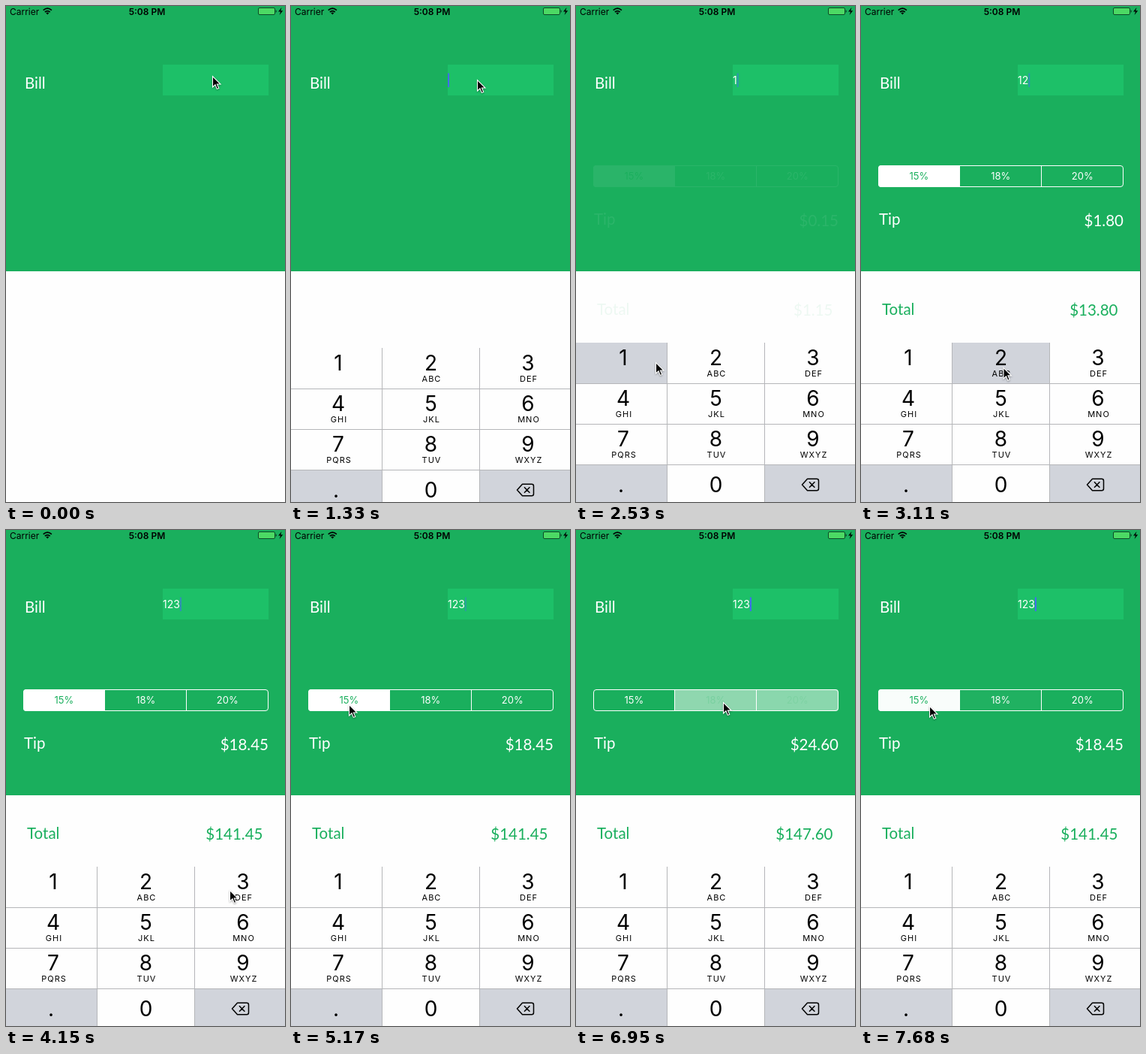
An HTML page for the animation above (8000 ms loop, 372x660 px).

```html
<!DOCTYPE html>
<html lang="en">
<head>
<meta charset="utf-8">
<title>Tip calculator</title>
<style>
  html, body { margin: 0; width: 372px; height: 660px; overflow: hidden; background: #fefefe; }
  svg { display: block; font-family: Inter, Roboto, sans-serif; }
  .label { font: 20.5px Lato, sans-serif; fill: #fff; }
  .green { fill: #1aaf5d; }
  .right { text-anchor: end; }
  .mid, .key text { text-anchor: middle; }
  .seg { font-size: 13px; }
  .digit { font-size: 28px; }
  .letters { font-size: 11px; letter-spacing: 1px; }
</style>
</head>
<body>
<svg width="372" height="660" viewBox="0 0 372 660">
  <rect width="372" height="353" class="green"/>

  <text x="5" y="11.5" font-size="12">Carrier</text>
  <g fill="none" stroke="#000" stroke-width="1.7">
    <path d="M49.7 5.6Q55.3 .8 60.9 5.6M51.9 8Q55.3 5.2 58.7 8"/>
    <path d="M53.3 9.3Q55.3 7.8 57.3 9.3L55.3 11.6Z" fill="#000" stroke="none"/>
  </g>
  <text x="188" y="11.5" class="mid" font-size="12" font-weight="600">5:08 PM</text>
  <rect x="336.5" y="2.5" width="22" height="9" rx="1.5" fill="#4cd964" stroke="#0b4a27"/>
  <path d="M359.5 5.2Q361 5.5 361 7T359.5 8.8Z" fill="#0b4a27"/>
  <path d="M367.5 2L363 7.6H366L364.6 12L369.2 6.2H366.2Z"/>

  <text x="25" y="110" class="label">Bill</text>
  <rect x="209" y="78" width="141" height="41" fill="#1dc068"/>
  <text id="bill" x="209" y="104" font-size="14" fill="#fff"></text>
  <rect id="caret" y="89.5" width="2" height="18.5" fill="#426bf2"/>

  <g id="details">
    <clipPath id="pill"><rect x="23" y="212" width="327" height="29" rx="4"/></clipPath>
    <g id="segments" clip-path="url(#pill)"></g>
    <path d="M131.5 212V241M240.5 212V241" stroke="#fff"/>
    <rect x="23.5" y="212.5" width="326" height="28" rx="3.5" fill="none" stroke="#fff"/>
    <text x="24" y="290.5" class="label">Tip</text>
    <text id="tip" x="350" y="292.5" class="label right"></text>
    <text x="28" y="411" class="label green">Total</text>
    <text id="total" x="342.5" y="411.5" class="label green right"></text>
  </g>

  <g id="keypad"></g>

  <path id="pointer" d="M.5 .5V15L4 11.8 6.3 17.4 8.7 16.4 6.4 11H11Z" stroke="#fff" stroke-width="1.1"
        style="filter: drop-shadow(0 1px 1px #0005)"/>
</svg>
<script>
const $ = id => document.getElementById(id);
const LOOP = 8000, STEP = 147.7;   // the screen refreshes once per STEP
const GREY = '#d1d4db', WHITE = '#fefefe';
const RATES = [15, 18, 20];

// The user's script, in ms
const FOCUS = 1030;
const TYPED = [2430, 3020, 3480];  // moments the keys 1, 2 and 3 go down
const MOVES = [                    // leave, arrive, x, y
  [0, 290, 271, 97], [FOCUS, 1320, 248, 98], [1330, 2050, 106, 474],
  [2530, 2950, 185, 481], [3050, 3480, 298, 479], [4150, 5030, 77, 232],
  [5170, 5500, 186, 229], [5750, 6000, 302, 229], [6480, 6900, 196, 229], [7050, 7480, 91, 234]
];
const CHOICES = [                  // fade starts, amounts update, segment
  [5540, 5540, 1], [6050, 6050, 2], [6795, 7000, 1], [7420, 7520, 0]
];

const clamp = x => Math.min(1, Math.max(0, x));
const ease = x => (x = clamp(x), x * x * (3 - 2 * x));
const set = (el, attrs) => Object.entries(attrs).forEach(a => el.setAttribute(...a));

$('segments').innerHTML = RATES.map((r, i) =>
  `<rect x="${23 + i * 109}" y="212" width="109" height="29" fill="#fff"/>
   <text x="${77.3 + i * 109}" y="231" class="seg mid">${r}%</text>`).join('');
const fills = $('segments').querySelectorAll('rect');
const names = $('segments').querySelectorAll('text');

const edges = [0, 121, 251, 372], centres = [63, 186.5, 316];
const letters = ['', 'ABC', 'DEF', 'GHI', 'JKL', 'MNO', 'PQRS', 'TUV', 'WXYZ'];
const bottomRow = [
  '<text x="60" y="199" class="digit">.</text>',
  '<text x="186.5" y="199" class="digit">0</text>',
  `<path d="M301.5 189L308.5 181.2H321Q323.5 181.2 323.5 183.7V194.3Q323.5 196.8 321 196.8H308.5Z
    M311 185.2L318.4 192.8M318.4 185.2L311 192.8" fill="none" stroke="#000" stroke-width="1.5" stroke-linejoin="round"/>`
];
function keyMarkup(i) {
  const c = i % 3, y = Math.floor(i / 3) * 54, x = centres[c];
  const face = i < 9
    ? `<text x="${x}" y="${y + 30}" class="digit">${i + 1}</text>
       <text x="${x + 1}" y="${y + 45}" class="letters">${letters[i]}</text>`
    : bottomRow[c];
  const fill = i === 9 || i === 11 ? GREY : WHITE;
  return `<g class="key"><rect x="${edges[c]}" y="${y}" width="${edges[c + 1] - edges[c]}" height="54" fill="${fill}"/>${face}</g>`;
}
$('keypad').innerHTML = Array.from({ length: 12 }, (_, i) => keyMarkup(i)).join('') +
  '<path d="M121.5 0V216M251.5 0V216M0 54.5H372M0 108.5H372M0 162.5H372" fill="none" stroke="#b5b6b9"/>';
const keyFaces = $('keypad').querySelectorAll('rect');

// The blink restarts on focus and on every typed digit.
function caretAlpha(t) {
  const start = [FOCUS, ...TYPED].findLast(s => s <= t);
  if (start === undefined) return 0;
  const phase = (t - start) / 1000 % 1;
  return clamp(phase / .15) * clamp((.76 - phase) / .18);
}

function draw(t) {
  let x = 275, y = 93;
  for (const [leave, arrive, nx, ny] of MOVES) {
    const p = ease((t - leave) / (arrive - leave));
    x += (nx - x) * p;
    y += (ny - y) * p;
  }
  set($('pointer'), { transform: `translate(${x} ${y})` });

  // The keypad settles like a critically damped spring.
  const s = Math.max(0, t - FOCUS) / 58;
  set($('keypad'), { transform: `translate(0 ${448 + Math.round(212 * (1 + s) * Math.exp(-s))})` });
  TYPED.forEach((down, i) =>
    set(keyFaces[i], { fill: t > down - 100 && t < down + 150 ? GREY : WHITE }));

  const bill = '123'.slice(0, TYPED.filter(down => down <= t).length);
  const choice = CHOICES.findLast(c => c[1] <= t);
  const tip = bill * RATES[choice ? choice[2] : 0] / 100;
  $('bill').textContent = bill;
  $('tip').textContent = '$' + tip.toFixed(2);
  $('total').textContent = '$' + (+bill + tip).toFixed(2);
  set($('caret'), { x: 209 + (bill ? $('bill').getComputedTextLength() : 0), opacity: caretAlpha(t) });
  set($('details'), { opacity: ease((t - TYPED[0]) / 500) });

  let selected = 0;
  for (const [fade, , i] of CHOICES) selected += (i - selected) * ease((t - fade) / 290);
  RATES.forEach((_, i) => {
    const p = clamp(1 - Math.abs(selected - i)), q = p ** .8;
    set(fills[i], { opacity: p });
    set(names[i], { fill: `rgb(${255 - 229 * q},${255 - 80 * q},${255 - 162 * q})` });
  });
}

function frame() {
  draw(Math.floor(performance.now() % LOOP / STEP + .06) * STEP);
  requestAnimationFrame(frame);
}
frame();
</script>
</body>
</html>
```
